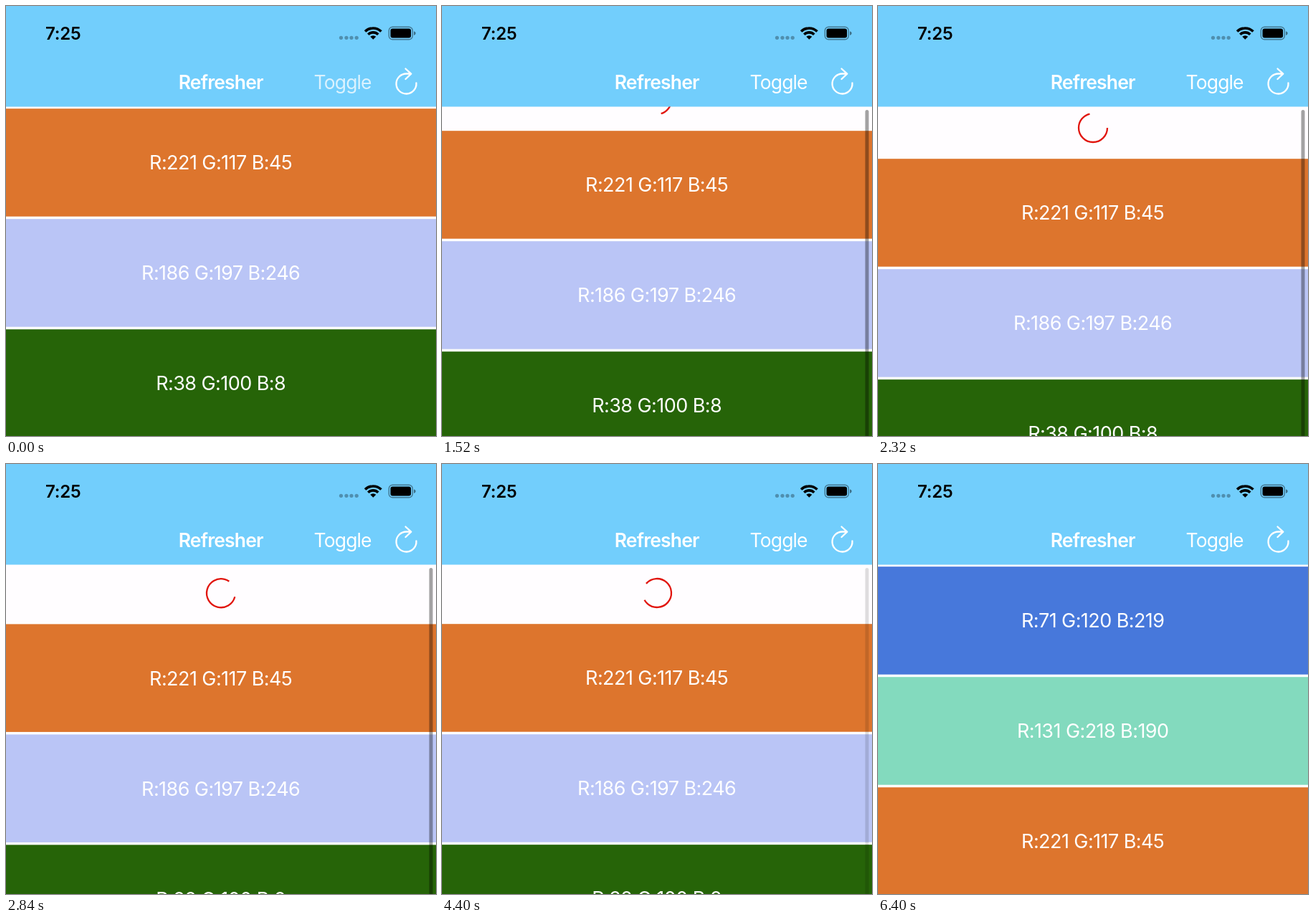
Animation, 600 px wide and 600 px high, one loop 6440 ms. Source, as an HTML page:

```html
<!DOCTYPE html>
<html lang="en">
<head>
<meta charset="utf-8">
<title>Pull to refresh</title>
<style>
  html, body { margin: 0; width: 100%; height: 100%; overflow: hidden; background: #fffdff; }
  svg { display: block; width: 100vw; height: 100vh; }
  text {
    font: 400 27px Inter, Roboto, sans-serif;
    font-optical-sizing: none;
    letter-spacing: -.57px;
    fill: #fff;
  }
  .mid { text-anchor: middle; }
  .bar { font-size: 26.5px; letter-spacing: -.85px; }
  .title { font-weight: 600; }
  .clock { font-size: 24px; font-weight: 600; letter-spacing: -.2px; fill: #000; }
  .line { fill: none; stroke: #fff; stroke-width: 2.3; stroke-linecap: round; stroke-linejoin: round; }
</style>
</head>
<body>
<svg viewBox="0 0 600 600">
  <rect width="600" height="600" fill="#fffdff"/>
  <circle id="spinner" r="20" fill="none" stroke="#e1140c" stroke-width="2.3" pathLength="360"/>
  <g id="old"></g>
  <g id="fresh"></g>
  <rect id="scroll" x="590.5" y="145" width="5" height="480" rx="2.5" opacity="0"/>

  <rect width="600" height="140.5" fill="#72cefc"/>
  <text class="clock" x="55" y="47">7:25</text>
  <g opacity=".3">
    <circle cx="467.5" cy="44.3" r="2.6"/><circle cx="475" cy="44.3" r="2.6"/>
    <circle cx="482" cy="44.3" r="2.6"/><circle cx="489.2" cy="44.3" r="2.6"/>
  </g>
  <g transform="translate(512.3 46.8)" fill="none" stroke="#000" stroke-width="3.6">
    <path d="M-11.2 -11.2A15.8 15.8 0 0 1 11.2 -11.2M-7 -7A9.9 9.9 0 0 1 7 -7"/>
    <path d="M0 0L-4 -4A5.7 5.7 0 0 1 4 -4Z" fill="#000" stroke="none"/>
  </g>
  <rect x="534.3" y="29.3" width="33" height="17.4" rx="5" fill="none" stroke="#000" stroke-opacity=".42" stroke-width="1.4"/>
  <rect x="536.5" y="31.4" width="28.6" height="13.2" rx="3"/>
  <path d="M569 35.3q2.8 .8 2.8 2.8t-2.8 2.8z" opacity=".45"/>
  <text class="bar title mid" x="299.7" y="115.5">Refresher</text>
  <text class="bar" id="toggle" x="429.5" y="115.5">Toggle</text>
  <path class="line" d="M572.5 107.5A14 14 0 1 1 558.5 94.5H565M557.5 87.5L565.3 94.7L557.5 102"/>
</svg>
<script>
const LOOP = 6440, STEP = 40, PITCH = 154, ARC = 290, REST = 80;
const RELEASE = 4200, INSERT = 5762, CLOSE = 5768;
// finger drag: [time, distance]
const drag = [[900, 0], [1520, 31], [2320, 70], [2880, 81], [2960, 81],
              [3560, 89], [3640, 90], [4080, 103]];

const el = id => document.getElementById(id);
const clamp = x => Math.min(1, Math.max(0, x));
const ease = (t, start, length) => (1 - Math.cos(Math.PI * clamp((t - start) / length))) / 2;

function addRows(id, colors) {
  el(id).innerHTML = colors.map(([r, g, b], i) => `
    <g transform="translate(0 ${i * PITCH})">
      <rect y="141.5" width="600" height="${PITCH}" fill="#fff"/>
      <rect y="143.2" width="600" height="150.5" fill="rgb(${r},${g},${b})"/>
      <text class="mid" x="299.7" y="228.3">R:${r} G:${g} B:${b}</text>
    </g>`).join('');
}
addRows('old', [[221, 117, 45], [186, 197, 246], [38, 100, 8]]);
addRows('fresh', [[71, 120, 219], [131, 218, 190]]);

function dragged(t) {
  const next = drag.findIndex(p => p[0] > t);
  if (next === 0) return 0;
  if (next < 0) return drag[drag.length - 1][1];
  const [t0, y0] = drag[next - 1], [t1, y1] = drag[next];
  return y0 + (y1 - y0) * (t - t0) / (t1 - t0);
}

function offset(t) {
  const y = dragged(t);
  return (y + (REST - y) * ease(t, RELEASE, 200)) * (1 - ease(t, CLOSE, 220));
}

function draw(t) {
  const y = offset(t), grown = ease(t, INSERT, 220);
  const move = (id, dy) => el(id).setAttribute('transform', `translate(0 ${dy})`);
  move('old', y + 2 * PITCH * grown);
  move('fresh', y);
  el('fresh').setAttribute('opacity', grown);

  // the arc grows with the pull, then turns with it, then spins freely
  const tip = Math.max(0, 4.7 * (y - 15.4));
  const sweep = t < RELEASE ? Math.min(ARC, tip) : ARC;
  const turn = t < RELEASE ? tip - sweep : 221 + (t - 4400) * .5086;
  const spinner = el('spinner');
  spinner.setAttribute('transform', `translate(300 ${100 + y}) rotate(${turn})`);
  spinner.setAttribute('stroke-dasharray', `${sweep} 360`);

  el('scroll').setAttribute('opacity', t < 920 ? 0 : .36 * (1 - clamp((t - 4240) / 250)));
  el('toggle').setAttribute('opacity', .75 + .25 * clamp(t / 280));
}

const began = performance.now();
function frame() {
  const t = (performance.now() - began) % LOOP;
  draw(Math.floor(t / STEP) * STEP);
  requestAnimationFrame(frame);
}
frame();
</script>
</body>
</html>
```
